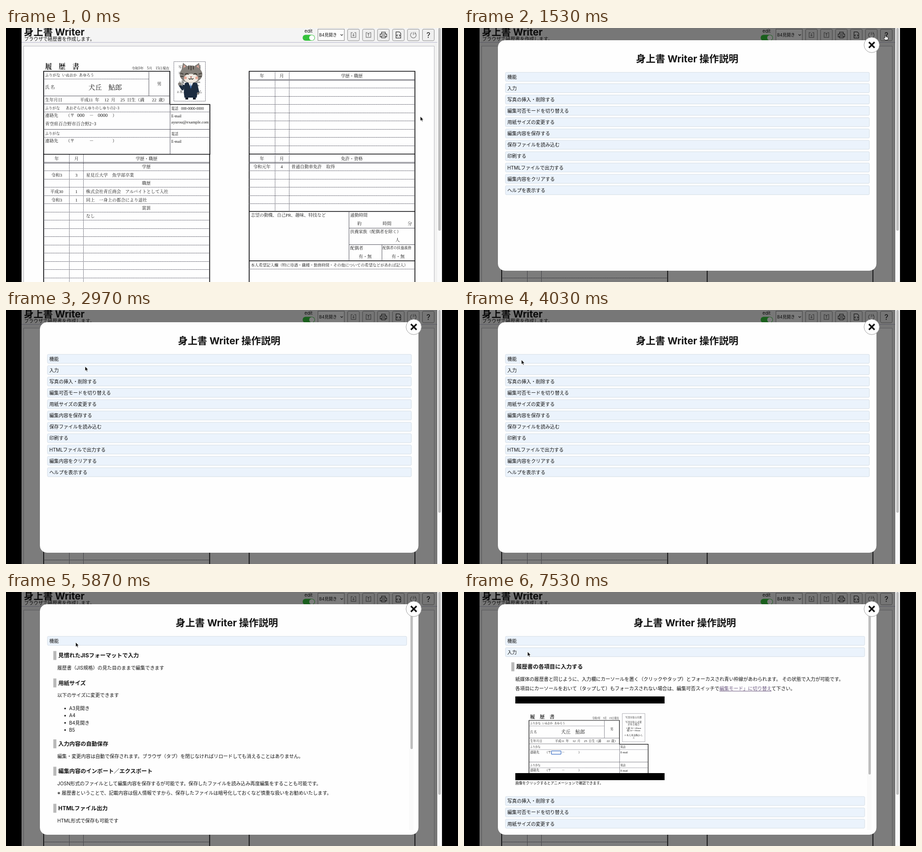
Animation of 960x540 px, one loop 7560 ms. Source, as an HTML page:

```html
<!DOCTYPE html>
<html lang="ja">
<head>
<meta charset="utf-8">
<title>身上書 Writer</title>
<style>
html, body { margin: 0; width: 100%; height: 100%; overflow: hidden; background: #000; }
svg { display: block; width: 960px; height: 540px; }
text { font-family: Inter, 'Noto Sans CJK JP', 'Noto Sans CJK', sans-serif; fill: #141414; white-space: pre; }
.form text { font-family: 'Liberation Serif', 'Noto Serif CJK JP', 'Noto Sans CJK JP', 'Noto Sans CJK', serif; }
text.m { text-anchor: middle; }
text.e { text-anchor: end; }
text.b { font-weight: 700; }
.thick, .thin, .dash, .icon, .stroke { fill: none; }
.thick { stroke: #0a0a0c; stroke-width: 1.7; }
.thin { stroke: #5c5c66; stroke-width: 1; }
.dash { stroke: #666672; stroke-width: 1; stroke-dasharray: 2 .7; }
.icon { stroke: #333; stroke-width: 1.2; }
.pale { stroke: #777; }
.link { fill: #6d5a80; text-decoration: underline; }

.modal, .menu, .features, .input, .arrow, .hand, .cursor { animation: 7560ms step-end infinite; }
.modal { animation-name: modal; }
.menu { animation-name: menu; }
.features { animation-name: features; }
.input { animation-name: input; }
.arrow { animation-name: arrow; }
.hand { animation-name: hand; }
.cursor { animation-name: move; animation-timing-function: ease-in-out; }

@keyframes modal { 0% { visibility: hidden } 16.53%, 100% { visibility: visible } }
@keyframes menu {
  0% { visibility: hidden } 16.53% { visibility: visible } 56.22% { visibility: hidden }
  79.37% { visibility: visible } 95.9%, 100% { visibility: hidden }
}
@keyframes features { 0% { visibility: hidden } 56.22% { visibility: visible } 79.37%, 100% { visibility: hidden } }
@keyframes input { 0% { visibility: hidden } 95.9%, 100% { visibility: visible } }
@keyframes arrow { 0% { visibility: visible } 12.9% { visibility: hidden } 23.3%, 100% { visibility: visible } }
@keyframes hand { 0% { visibility: hidden } 12.9% { visibility: visible } 23.3%, 100% { visibility: hidden } }
@keyframes move {
  0%, 6.6% { transform: translate(880px, 188px) }
  13.9%, 23.1% { transform: translate(894px, 14px) }
  37%, 41% { transform: translate(168px, 120px) }
  51.6%, 58.2% { transform: translate(122px, 106px) }
  63.1%, 66% { transform: translate(122px, 121px) }
  72.8%, 80% { transform: translate(148px, 107px) }
  86%, 100% { transform: translate(135px, 127px) }
}
</style>
</head>
<body>
<script>
const text = (x, y, size, s, cls = '') => `<text x="${x}" y="${y}" font-size="${size}" class="${cls}">${s}</text>`;
const rect = (x, y, w, h, fill, more = '') => `<rect x="${x}" y="${y}" width="${w}" height="${h}" fill="${fill}" ${more}/>`;
const path = (d, cls) => `<path d="${d}" class="${cls}"/>`;
const group = (cls, ...parts) => `<g class="${cls}">${parts.join('')}</g>`;
const def = (id, ...parts) => `<g id="${id}" class="form">${parts.join('')}</g>`;
const h = (y, x1, x2) => `M${x1} ${y}H${x2}`;
const v = (x, y1, y2) => `M${x} ${y1}V${y2}`;
const rows = (y, n, x1, x2) => Array.from({ length: n }, (_, i) => h(Math.round(y + i * 17.5) + .5, x1, x2)).join('');

const NAME = '身上書 Writer';
const F = 9.25;
const PAPER = '#fefefe';

// Blank upper form, shared by the page and the help picture
const blank = def('blank',
  text(83, 87, 14.5, '履　歴　書', 'b'),
  text(347, 88, 7.3, '令和3年　5月　15日現在', 'e'),
  path('M80 269V92H348V162.5H433V269M79 268.5H434', 'thick'),
  path(v(303.5, 92, 144) + h(144.5, 80, 348) + h(161.5, 80, 348) + v(348.5, 162, 268) + h(215.5, 80, 433), 'thin'),
  path(h(108.5, 80, 303) + h(178.5, 80, 433) + h(232.5, 80, 433), 'dash'),
  text(83, 103, 8, 'ふりがな'), text(83, 129, 9.2, '氏 名'),
  text(83, 156, 9.2, '生年月日'),
  [[173, 189], [227, 243]].map(([a, b]) =>
    text(83, a, 7.8, 'ふりがな') + text(83, b, F, '連絡先') +
    text(127, b, F, '（〒') + text(177, b, F, '－') + text(226, b, F, '）') +
    text(351, a + .5, 7.5, '電話') + text(351, b + .5, 8, 'E-mail')).join(''));

const person = def('person',
  text(119, 103, 8, 'いぬおか'), text(155, 103, 8, 'あゆろう'),
  text(175, 131, 14.2, '犬丘　鮎郎'), text(325.5, 121.5, 9, '男', 'm'),
  text(157, 156, F, '平成11&ensp;年'), text(209, 156, F, '12&ensp;月'),
  text(243, 156, F, '25&ensp;日生（満'), text(310, 156, F, '22&ensp;歳）'));

const photoNote = def('note',
  rect(356.5, 71.5, 67, 84, PAPER, 'stroke="#666672" stroke-width=".9" stroke-dasharray="2 .6"'),
  [[85, '写真を貼る位置'], [99, '写真を貼る必要'], [106, 'がある場合'], [117, '1.縦 36～40mm'],
   [124, '横 24～30mm'], [138, '2.本人単身胸から'], [145, '上']]
    .map(([y, s]) => text(390, y, 6.9, s, 'm')).join(''));

const contact = group('form',
  text(127, 173, 7.8, 'あおぞらけんゆりのしゆりの2−3'),
  text(151, 189, 10.5, '000'), text(195, 189, 10.5, '0000'),
  text(83, 207, 9.4, '青空県百合野市百合野2−3'),
  text(372, 174, 7.8, '000-0000-0000'), text(351, 202.5, 8.8, 'ayurou@example.com'));

const cat = `
  <path d="M384 146V152M400 146V152" stroke="#17202c" stroke-width="6"/>
  <path d="M378 121L375 130 369 121" class="stroke" stroke="#1d2c40" stroke-width="5" stroke-linejoin="round"/>
  <path d="M380 117Q392 112 404 117Q409 131 405 148H379Q376 132 380 117Z" fill="#1d2c40"/>
  <path d="M404 119L408 137" stroke="#1d2c40" stroke-width="5" stroke-linecap="round"/>
  <circle cx="369" cy="119" r="3.6" fill="#85807a"/><circle cx="408" cy="139" r="2.6" fill="#85807a"/>
  <path d="M387 115H398L392.500 127Z" fill="#fff"/>
  <path d="M392.500 117L394 126 392.500 129 391 126Z" fill="#3565a8"/>
  <path d="M372 93L376 74 387 83H398L410 74 414 93Z" fill="#85807a"/>
  <path d="M376.500 86L378 78 383 83ZM404 83L408.500 78 410 86Z" fill="#e2a59a"/>
  <ellipse cx="393" cy="98.500" rx="24" ry="18.500" fill="#85807a"/>
  <ellipse cx="393" cy="107" rx="15" ry="9.500" fill="#efe8e0"/>
  <path class="stroke" d="M388 81V88M393 80V90M398 81V88M370 96L377 98M370 103L377 103M416 96L409 98M416 103L409 103"
    stroke="#48433e" stroke-width="2"/>
  <path class="stroke" d="M380 99Q384 95 388 99M398 99Q402 95 406 99M388 107Q391 111 393 107Q395 111 398 107"
    stroke="#28231a" stroke-width="1.300"/>
  <path d="M390.500 103H395.500L393 106Z" fill="#b26159"/>
  <circle cx="381" cy="106" r="3" fill="#e8aa98"/><circle cx="405" cy="106" r="3" fill="#e8aa98"/>`;

const tableHead = (x, y, s) => text(x + 27.5, y, F, '年', 'm') + text(x + 69.5, y, F, '月', 'm') + text(x + 218.5, y, F, s, 'm');
const entry = (x, y, year, month, s) =>
  text(x + 27.5, y, F, year, 'm') + text(x + 69.5, y, F, month, 'm') + text(x + 90, y, F, s);

const history = group('form',
  path('M80 268V540M432.500 268V540', 'thick'),
  path(v(134.5, 269, 540) + v(164.5, 269, 540) + rows(303, 14, 80, 432), 'dash'),
  path(h(285.5, 80, 432) + h(287.5, 80, 432), 'thin'),
  tableHead(80, 281, '学歴・職歴'),
  [[298, '学歴'], [333, '職歴'], [386, '賞罰']].map(([y, s]) => text(298, y, F, s, 'm')).join(''),
  entry(80, 316, '令和3', '3', '星見丘大学　魚学部卒業'),
  entry(80, 351, '平成30', '1', '株式会社青丘商会　アルバイトとして入社'),
  entry(80, 368.5, '令和3', '1', '同上　一身上の都合により退社'),
  entry(80, 403, '', '', 'なし'));

const rightPage = group('form',
  path('M516.500 540V92H868.500V540M516 268H869M516 390H869M516 495H869', 'thick'),
  path(v(571.5, 92, 390) + v(601.5, 92, 390) + rows(127, 8, 516, 868) + rows(303, 5, 516, 868) + h(512.5, 516, 868), 'dash'),
  path([109.5, 111.5, 285.5, 287.5].map(y => h(y, 516, 868)).join('') +
    v(728.5, 390, 495) + h(425.5, 728, 868) + h(460.5, 728, 868) + v(798.5, 460, 495), 'thin'),
  tableHead(516, 105, '学歴・職歴'), tableHead(516, 280.5, '免許・資格'),
  entry(516, 298, '令和元年', '4', '普通自動車免許　取得'),
  text(520, 401, F, '志望の動機、自己PR、趣味、特技など'),
  text(731, 401, F, '通勤時間'), text(746, 419, F, '約'), text(800, 419, F, '時間'), text(853, 419, F, '分'),
  text(731, 436, 9, '扶養家族（配偶者を除く）'), text(827, 454, F, '人'),
  text(731, 471, F, '配偶者'), text(800, 470, 7.6, '配偶者の扶養義務'),
  text(749, 489, F, '有・無'), text(819, 489, F, '有・無'),
  text(520, 506.5, 8.35, '本人希望記入欄（特に待遇・職種・勤務時間・その他についての希望などがあれば記入）'));

// Icons are drawn around the centre of each button
const icons = [
  ['M-2 -5H-5V5H5V-5H2M0 -4V2M-2 0L0 2 2 0', 'icon pale'],
  ['M-2 -5H-5V5H5V-5H2M0 3V-4M-2 -2L0 -4 2 -2', 'icon pale'],
  ['M-4 -2V-6H4V-2M-4 4H-7V-2H7V4H4M-4 2H4V6H-4Z', 'icon'],
  ['M-5 -6.500H2L5 -3.500V6.500H-5ZM-1.500 -1L-3.500 1 -1.500 3M1.500 -1L3.500 1 1.500 3', 'icon'],
  ['M-3 -5A6 6 0 1 0 5 -3M0 -6V0M3 -6L5 -3 2 -2', 'icon pale'],
  ['', 'icon']
];
const header =
  rect(33, 0, 893, 30, '#f4f4f4') + rect(33, 30, 883, 1, '#b9b8cf') +
  text(38, 15.8, 20.5, NAME, 'b') + text(38.5, 27, 10.05, 'ブラウザで経歴書を作成します。') +
  text(642.5, 10, 9.5, 'edit', 'm') +
  rect(630, 14.5, 26, 12.5, '#35c23c', 'rx="6.250"') +
  '<circle cx="649.500" cy="20.750" r="5.500" fill="#fff"/>' +
  rect(662.5, 2.5, 56, 24, '#fdfdfd', 'stroke="#8a8a8a"') + text(665, 17.5, 8.8, 'B4見開き') +
  path('M710.500 13.500L713 16 715.500 13.500', 'icon') +
  icons.map(([d, cls], i) => {
    const x = 738 + i * 31.8;
    return rect(x - 12.5, 2.5, 25, 24.5, '#efefef', 'rx="2.500" stroke="#8c8c8c"') +
      `<g transform="translate(${x} 14.8)">${path(d, cls)}</g>`;
  }).join('') + text(897, 20.5, 16, '?', 'm');

const page =
  rect(33, 0, 893, 540, '#f2f2f2') + header +
  rect(37.5, 38.5, 872, 520, PAPER, 'stroke="#b8b8be"') +
  '<use href="#blank"/><use href="#person"/><use href="#note"/>' + cat + contact + history + rightPage;

const topics = ['機能', '入力', '写真の挿入・削除する', '編集可否モードを切り替える', '用紙サイズの変更する', '編集内容を保存する',
  '保存ファイルを読み込む', '印刷する', 'HTMLファイルで出力する', '編集内容をクリアする', 'ヘルプを表示する'];
const bar = (y, w, s) =>
  rect(88, y, w, 19, '#ebf3fc', 'rx="2" stroke="#d5dee6"') + text(92, y + 13.4, 10.1, s);
const heading = (y, s) => rect(100.5, y - 9.5, 6.5, 19, '#b9b9b9') + text(111, y + 4.2, 11.8, s, 'b');
const para = (y, s, x = 109) => text(x, y + 3.8, 10.1, s);
const title = x => text(x, 73, 20.7, NAME + ' 操作説明', 'b m');
const scroller = end => rect(856, 42, 9.5, 464, '#fafafa') + rect(859, 44, 5, end - 44, '#bebebe', 'rx="2.500"');

const menu = group('menu', title(474), topics.map((s, i) => bar(94.3 + i * 24.1, 773, s)).join(''));

const features = group('features', title(469), scroller(334), bar(94.3, 763, topics[0]),
  heading(135, '見慣れたJISフォーマットで入力'),
  para(161, '履歴書（JIS規格）の見た目のままで編集できます'),
  heading(193.3, '用紙サイズ'),
  para(219.5, '以下のサイズに変更できます'),
  ['A3見開き', 'A4', 'B4見開き', 'B5'].map((s, i) => {
    const y = 247.3 + i * 15.2;
    return `<circle cx="125.500" cy="${y + .5}" r="1.700" fill="#141414"/>` + para(y, s, 134);
  }).join(''),
  heading(322.8, '入力内容の自動保存'),
  para(349, '編集・変更内容は自動で保存されます。ブラウザ（タブ）を閉じなければリロードしても消えることはありません。'),
  heading(381, '編集内容のインポート／エクスポート'),
  para(407.3, 'JOSN形式のファイルとして編集内容を保存するが可能です。保存したファイルを読み込み再度編集をすることも可能です。'),
  para(427.5, '※ 履歴書ということで、記載内容は個人情報ですから、保存したファイルは暗号化しておくなど慎重な扱いをお勧めいたします。'),
  heading(459.8, 'HTMLファイル出力'),
  para(486, 'HTML形式で保存も可能です'));

const input = group('input', title(469), scroller(388), bar(94.3, 763, topics[0]), bar(118.4, 763, topics[1]),
  heading(159, '履歴書の各項目に入力する'),
  para(185.3, '紙媒体の履歴書と同じように、入力欄にカーソールを置く（クリックやタップ）とフォーカスされ青い枠線があわられます。 その状態で入力が可能です。'),
  para(205.5, '各項目にカーソールをおいて（タップして）もフォーカスされない場合は、編集可否スイッチで<tspan class="link">編集モード」に切り替え</tspan>て下さい。'),
  rect(109, 222, 317, 178, '#000'), rect(109, 237, 317, 148, PAPER),
  `<g clip-path="url(#shot)"><g transform="translate(138 273) scale(.717) translate(-80 -92)">
    <use href="#blank"/><use href="#person"/><use href="#note"/></g></g>`,
  rect(185.5, 337.8, 20.5, 7, PAPER, 'rx="1" stroke="#3b6fc4" stroke-width="1.300"'),
  text(109, 409, 7.5, '画像をクリックするとアニメーションで確認できます。'),
  [2, 3, 4].map(i => bar(386.7 + i * 24.1, 763, topics[i])).join(''));

const modal = group('modal',
  rect(33, 0, 883, 540, '#000', 'opacity=".51"'),
  rect(72, 26, 804, 490, PAPER, 'rx="15"')) +
  menu + features + input +
  group('modal',
    `<circle cx="866" cy="36" r="16.300" fill="${PAPER}" stroke="#a0a0a0"/>`,
    '<path d="M860 30L872 42M872 30L860 42" stroke="#111" stroke-width="3.200"/>');

const pageScroll = rect(916, 0, 10, 540, '#fafafa') + rect(918, 0, 5.5, 431, '#bebebe', 'rx="2.700"');

const cursor = group('cursor',
  `<path class="arrow" d="M0 0V9.500L2.200 7.500 3.700 11 5.300 10.300 3.800 7H6.600Z"
    fill="#000" stroke="#fff" stroke-width=".7"/>`,
  `<path class="hand" d="M0 1Q1 0 2 1V4.500L6 5.500Q7.500 6 7 8L6 11.500H0.500L-3 7.500Q-3 6 -1.500 6.500L0 7.500Z"
    fill="#fff" stroke="#000" stroke-width=".9"/>`);

document.body.insertAdjacentHTML('beforeend',
  `<svg viewBox="0 0 960 540" xmlns="http://www.w3.org/2000/svg">
    <defs><clipPath id="shot">${rect(109, 237, 317, 148, '#000')}</clipPath>${blank}${person}${photoNote}</defs>
    ${rect(0, 0, 960, 540, '#000')}${page}${modal}${pageScroll}${cursor}</svg>`);
</script>
</body>
</html>
```
